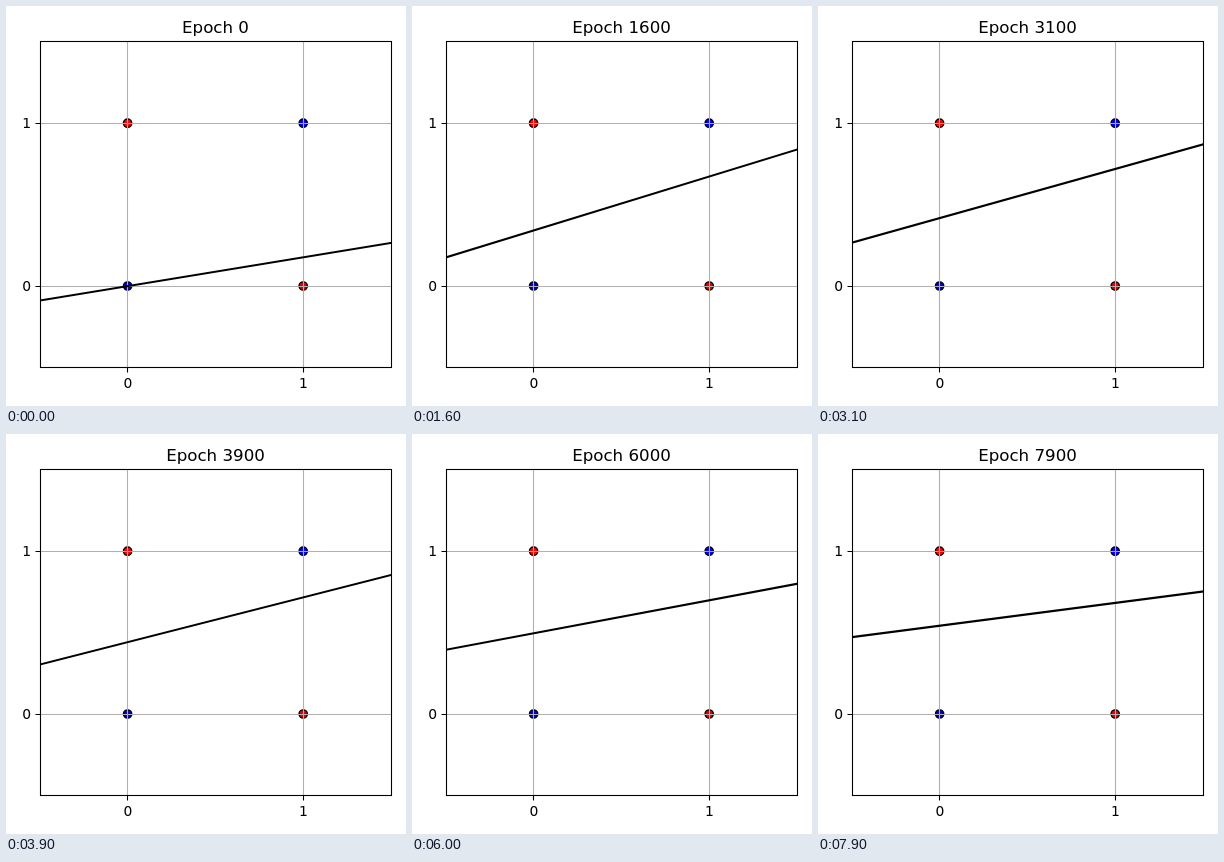
Recreate the animation shown at these times as an HTML page. Size 400x400 px, loop 8000 ms.

```html
<!DOCTYPE html>
<html lang="en">
<head>
<meta charset="utf-8">
<title>Decision boundary</title>
<style>
  html, body { margin: 0; width: 100%; height: 100%; overflow: hidden; background: #fff; }
  svg { display: block; width: 400px; height: 400px; }
  text { font: 13.89px "DejaVu Sans", sans-serif; text-anchor: middle; }
  #title { font-size: 16.67px; }
  .end { text-anchor: end; }
  .dot { stroke: #000; stroke-width: 1.39; }
  .thin { fill: none; stroke: #000; stroke-width: 1.1; }
  .grid { stroke: #b0b0b0; }
</style>
</head>
<body>
<svg viewBox="0 0 400 400">
  <clipPath id="axes"><rect x="34.5" y="35.5" width="351" height="326"/></clipPath>
  <g class="dot">
    <circle cx="121.6" cy="117.2" r="4.17" fill="#f00"/>
    <circle cx="297.2" cy="117.2" r="4.17" fill="#00f"/>
    <circle cx="121.6" cy="280" r="4.17" fill="#00c"/>
    <circle cx="297.2" cy="280" r="4.17" fill="#d00"/>
  </g>
  <path class="thin grid" d="M121.5 36V361M297.5 36V361M35 117.5H385M35 280.5H385"/>
  <path class="thin" d="M121.5 362v4.5M297.5 362v4.5M34 117.5h-4.5M34 280.5h-4.5"/>
  <path id="line" clip-path="url(#axes)" stroke="#000" stroke-width="2.08"/>
  <rect class="thin" x="34.5" y="35.5" width="351" height="326"/>
  <text id="title" x="209.5" y="27"></text>
  <text x="122" y="382">0</text>
  <text x="297.5" y="382">1</text>
  <text class="end" x="25" y="122">1</text>
  <text class="end" x="25" y="285">0</text>
</svg>
<script>
const title = document.getElementById('title');
const line = document.getElementById('line');

// Gradient descent on XOR: fast and antisymmetric weight modes relative to the slow one.
function boundary(epoch) {
  const s = epoch * 2.578e-4;
  const fast = Math.exp(-5.744 * s);
  const anti = 2.433 * Math.exp(-0.345 * s + 0.023 * s * s);
  const even = 1 + 0.7034 * fast;
  return {
    slope: (anti - even) / (anti + even),
    bias: (1.186 + 0.037 * s) * (1 - fast) / (anti + even)
  };
}

const px = x => 121.75 + 175.5 * x;
const py = y => 280.1 - 163 * y;

function draw(now) {
  const epoch = Math.floor(now % 8000 / 100) * 100;
  const { slope, bias } = boundary(epoch);
  const point = x => `${px(x)} ${py(slope * x + bias)}`;
  title.textContent = `Epoch ${epoch}`;
  line.setAttribute('d', `M${point(-0.6)}L${point(1.6)}`);
}

let start;
function tick(now) {
  start ??= now;
  draw(now - start);
  requestAnimationFrame(tick);
}
draw(0);
requestAnimationFrame(tick);
</script>
</body>
</html>
```
